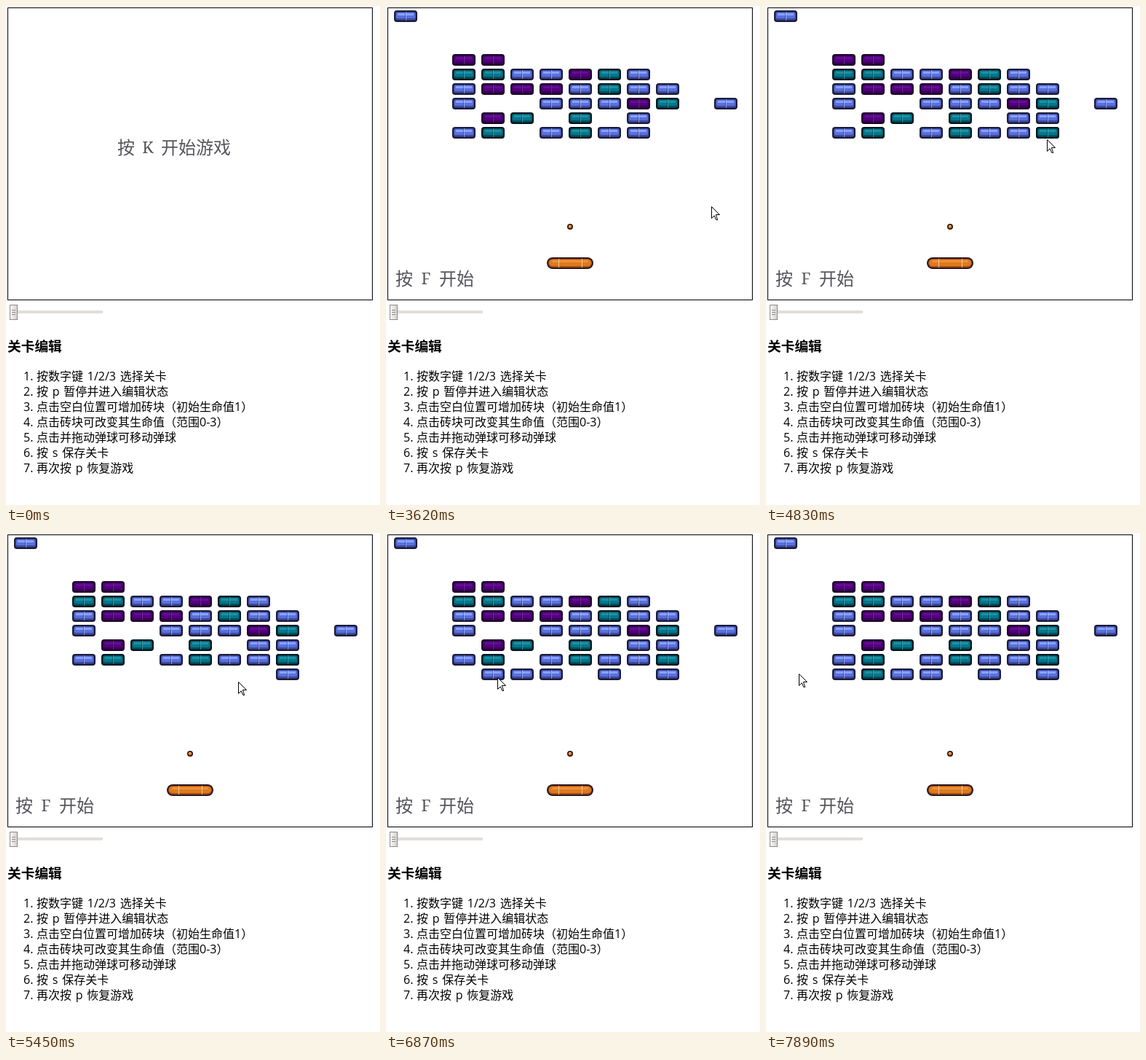
An HTML page that plays this animation: 514x685 px, repeating every 8000 ms.

```html
<!DOCTYPE html>
<html lang="zh">
<head>
<meta charset="utf-8">
<style>
  html, body { margin: 0; width: 100%; height: 100%; overflow: hidden; background: #fff; }
  svg { display: block; }
  text { font: 16px "Open Sans", "Noto Sans CJK SC", "Noto Sans CJK", sans-serif; white-space: pre; }
  #list text { word-spacing: 1.6px; }
  .bracket { font-family: "Noto Sans CJK TC", "Noto Sans CJK", sans-serif; }
  .heading { font-size: 18.72px; font-weight: bold; }
  .prompt text { font: 300 24px "Noto Sans CJK SC", "Noto Sans CJK", sans-serif; fill: #55555c; }
  .prompt .key { font: 300 22px "Noto Serif", serif; font-stretch: extra-condensed; text-anchor: middle; }
  .pixel { shape-rendering: crispEdges; }
  .b { --edge: #1c1c38; --dark: #3f4ba0; --main: #5a70dc; --light: #86a2ff; --seam: #b4c2ff; }
  .t { --edge: #00171f; --dark: #03505f; --main: #04778b; --light: #1f90a4; --seam: #4fabb9; }
  .p { --edge: #1f0029; --dark: #3c005a; --main: #530080; --light: #620d94; --seam: #7c3a9c; }
</style>
</head>
<body>
<svg width="514" height="685" viewBox="0 0 514 685">
  <defs>
    <g id="brick">
      <rect width="32" height="16" rx="4" fill="var(--edge)"/>
      <rect x="2" y="2" width="28" height="11.5" rx="2.5" fill="var(--dark)"/>
      <rect x="3" y="3" width="26" height="8" rx="2" fill="var(--main)"/>
      <g class="pixel">
        <path d="M5 4H27V7H5Z" fill="var(--light)"/>
        <path d="M15 2H16V14H15Z" fill="var(--edge)" opacity=".4"/>
        <path d="M16 2H17V14H16Z" fill="var(--seam)" opacity=".7"/>
      </g>
    </g>
    <linearGradient id="thumb">
      <stop stop-color="#fafafa"/><stop offset="1" stop-color="#d2d0cc"/>
    </linearGradient>
    <radialGradient id="orb" cx=".4" cy=".35">
      <stop stop-color="#ffbd78"/><stop offset="1" stop-color="#c0600f"/>
    </radialGradient>
  </defs>

  <rect x="2.5" y="2.5" width="501" height="401" fill="none" stroke="#000"/>

  <g id="intro" class="prompt">
    <text x="153" y="203">按</text>
    <text class="key" x="195" y="202">K</text>
    <text x="213" y="203">开始游戏</text>
  </g>

  <g id="game" visibility="hidden">
    <g id="bricks"></g>
    <circle cx="253" cy="303" r="3.2" fill="url(#orb)" stroke="#2c130c" stroke-width="1.6"/>
    <g transform="translate(221 345)">
      <rect width="64" height="16" rx="8" fill="#2a1820"/>
      <rect x="2" y="2" width="60" height="12" rx="6" fill="#a64e12"/>
      <rect x="3" y="3" width="58" height="9" rx="4.5" fill="#de7a1e"/>
      <rect x="7" y="4" width="50" height="3" rx="1.5" fill="#ee9038"/>
      <path class="pixel" d="M16 2H17V14H16ZM48 2H49V14H48Z" fill="#f8c48a"/>
    </g>
    <g class="prompt">
      <text x="13" y="383">按</text>
      <text class="key" x="55" y="382">F</text>
      <text x="73" y="383">开始</text>
    </g>
  </g>

  <rect x="5" y="418" width="128" height="4" rx="1" fill="#e1ddda"/>
  <rect x="5.5" y="410.5" width="10" height="20" fill="url(#thumb)" stroke="#8d8b88"/>
  <path d="M8 417.5H13M8 420.5H13M8 423.5H13" stroke="#8f8d8a"/>

  <text class="heading" x="2" y="474">关卡编辑</text>
  <g id="list"></g>

  <path id="cursor" visibility="hidden" fill="#fff" stroke="#000" stroke-linejoin="round"
        d="M.5 .5V16.5L4.2 12.8L6.8 18.5H8.7L6.4 11.5H11.5Z"/>
</svg>

<script>
const LOOP = 8000, GAME_START = 790;
const $ = id => document.getElementById(id);

function add(parent, tag, attrs, text = '') {
  const el = document.createElementNS('http://www.w3.org/2000/svg', tag);
  for (const key in attrs) el.setAttribute(key, attrs[key]);
  el.textContent = text;
  return parent.appendChild(el);
}

const addBrick = (col, row, kind) =>
  add($('bricks'), 'use', { href: '#brick', x: 11 + 40 * col, y: 6 + 20 * row, class: kind });

const show = (el, on) => el.setAttribute('visibility', on ? 'inherit' : 'hidden');

// b, t and p are the three brick strengths; a dot is an empty cell
const level = ['b', '', '', '..pp', '..ttbbptb', '..bpppbtbb', '..b..bbbpt.b', '...pt.t.b', '..bt.btbb'];
level.forEach((line, row) => [...line].forEach((kind, col) => {
  if (kind !== '.') addBrick(col, row, kind);
}));

// time, column, row, kind
const edits = [
  [4020, 9, 8, 'b'], [4430, 9, 7, 'b'], [4830, 9, 8, 't'], [5250, 9, 9, 'b'], [5650, 7, 9, 'b'],
  [6050, 5, 9, 'b'], [6470, 4, 9, 'b'], [6870, 3, 9, 'b'], [7290, 3, 9, 't'], [7690, 2, 9, 'b']
].map(([time, ...cell]) => ({ time, el: addBrick(...cell) }));

// time, x, y
const pointer = [
  [3620, 447, 275], [3820, 398, 167], [4020, 398, 166], [4230, 377, 157], [4430, 378, 157],
  [4630, 386, 182], [4830, 386, 183], [5050, 378, 187], [5250, 369, 191], [5450, 319, 204],
  [5650, 288, 205], [5850, 227, 204], [6050, 215, 206], [6270, 194, 200], [6470, 187, 199],
  [6670, 162, 195], [6870, 153, 198], [7090, 130, 200], [7490, 102, 194], [7690, 98, 194],
  [7890, 45, 193]
];

[
  '按数字键 1/2/3 选择关卡',
  '按 p 暂停并进入编辑状态',
  '点击空白位置可增加砖块（初始生命值1）',
  '点击砖块可改变其生命值（范围0-3）',
  '点击并拖动弹球可移动弹球',
  '按 s 保存关卡',
  '再次按 p 恢复游戏'
].forEach((line, i) => {
  const y = 514 + 21 * i;
  add($('list'), 'text', { x: 24, y }, `${i + 1}.`);
  const item = add($('list'), 'text', { x: 42, y });
  // the brackets sit in the middle of their cells
  line.split(/([（）])/).forEach(part =>
    add(item, 'tspan', /[（）]/.test(part) ? { class: 'bracket', lang: 'zh-Hant' } : {}, part));
});

function draw(time) {
  show($('intro'), time < GAME_START);
  show($('game'), time >= GAME_START);
  edits.forEach(edit => show(edit.el, time >= edit.time));
  const spot = pointer.filter(([start]) => time >= start).pop();
  show($('cursor'), spot);
  if (spot) $('cursor').setAttribute('transform', `translate(${spot[1]} ${spot[2]})`);
}

const begin = performance.now();
function tick() {
  draw((performance.now() - begin) % LOOP);
  requestAnimationFrame(tick);
}
tick();
</script>
</body>
</html>
```
